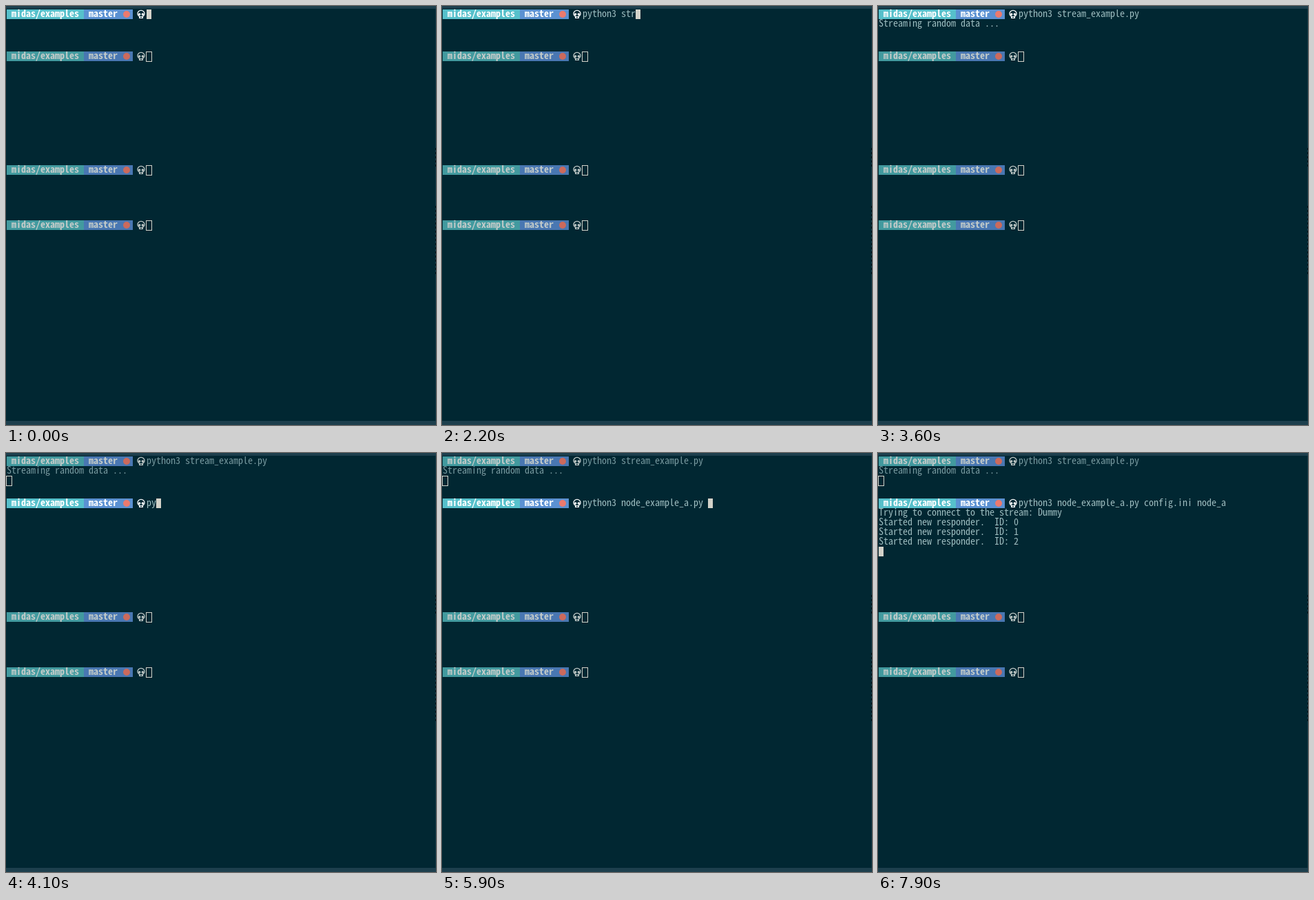
Recreate the animation shown at these times as an HTML page with a canvas. Size 624 px wide and 608 px high, loop 8 s.

```html
<!DOCTYPE html>
<html lang="en">
<head>
<meta charset="utf-8">
<title>Terminal panes</title>
<style>
html, body { margin: 0; width: 624px; height: 608px; overflow: hidden; background: #012732; }
canvas { display: block; }
</style>
</head>
<body>
<canvas id="stage" width="624" height="608"></canvas>
<script>
const ctx = document.getElementById('stage').getContext('2d');
const CELL = 7, ROW = 14, LEFT = 1, INPUT = 204, LOOP = 8000, SWITCH = 3700;
const BG = '#012732', CURSOR = '#d3d2c9';
const FONTS = '"Noto Sans Mono CJK JP", "Noto Sans Mono", "DejaVu Sans Mono", monospace';

// Pick the size at which one character fills one cell.
ctx.font = `100px ${FONTS}`;
const size = 100 * CELL / ctx.measureText('0').width;

const BRIGHT = { path: '#56c0cb', branch: '#5b91d2', dot: '#ec7a6e', label: '#ffffff', text: '#9cbabd' };
const DIM = { path: '#429a9f', branch: '#4977b2', dot: '#cc6a5c', label: '#c3cbc9', text: '#76979d' };

// keys: time at which each successive character appears; jumps: [time, length] for completions.
const panes = [
  { top: 5, command: 'python3 stream_example.py ',
    keys: [400, 600, 800, 1000, 1100, 1300, 1400, 1600, 1800, 2000, 2200, 2400],
    jumps: [[2600, 26]], enter: 3000,
    output: [[3400, 'Streaming random data ...']] },
  { top: 66, command: 'python3 node_example_a.py config.ini node_a',
    keys: [3900, 4000, 4200, 4300, 4400, 4600, 4700, 4900, 5000, 5100, 5200, 5300],
    jumps: [[5400, 21], [5600, 22], [5800, 26], [6000, 27], [6100, 28], [6200, 29],
            [6400, 37], [6600, 38], [6800, 39], [7000, 40], [7100, 43]], enter: 7400,
    output: [[7600, 'Trying to connect to the stream: Dummy'],
             ...[0, 1, 2].map(id => [7800, `Started new responder.  ID: ${id}`])] },
  { top: 231 },
  { top: 311 }
];

function box(x, y, w, h, color) {
  ctx.fillStyle = color;
  ctx.fillRect(x, y, w, h);
}

function write(text, x, top, color, weight = 400) {
  ctx.font = `${weight} ${size}px ${FONTS}`;
  ctx.fillStyle = color;
  ctx.fillText(text, x, top + 11);
}

function disc(x, y, r, color) {
  ctx.fillStyle = color;
  ctx.beginPath();
  ctx.arc(x, y, r, 0, 7);
  ctx.fill();
}

function skull(top, color) {
  ctx.strokeStyle = color;
  ctx.lineWidth = 1.3;
  ctx.beginPath();
  ctx.ellipse(196, top + 6, 5, 4.6, 0, 0, 7);
  ctx.stroke();
  disc(193.7, top + 7, 1.7, color);
  disc(198.3, top + 7, 1.7, color);
  box(193, top + 10, 6, 3, color);
  box(194.5, top + 11, 3, 1, BG);
}

function prompt(top, look) {
  box(LEFT, top, 112, ROW, look.path);
  box(113, top, 71, ROW, look.branch);
  write('midas/examples', 8, top, look.label, 700);
  write('master', 120, top, look.label, 700);
  disc(175, top + 7, 5, look.dot);
  skull(top, look.label);
}

function cursor(x, top, active) {
  if (active) return box(x, top, CELL, ROW, CURSOR);
  ctx.strokeStyle = CURSOR;
  ctx.lineWidth = 1;
  ctx.strokeRect(x - 0.5, top + 0.5, 8, ROW);
}

function typed(pane, t) {
  let count = pane.keys.filter(k => k <= t).length;
  for (const [time, length] of pane.jumps) if (time <= t) count = length;
  return count;
}

function drawPane(pane, t, active) {
  const { top } = pane, look = active ? BRIGHT : DIM;
  prompt(top, look);
  if (!pane.command) return cursor(INPUT, top, false);

  const count = typed(pane, t);
  write(pane.command.slice(0, count), INPUT, top, look.text);
  if (t < pane.enter) return cursor(INPUT + count * CELL, top, active);

  const lines = pane.output.filter(([time]) => time <= t);
  lines.forEach(([, line], i) => write(line, LEFT, top + ROW * (i + 1), look.text));
  const blinkedOff = t >= 3500 && t < SWITCH;
  if (!blinkedOff) cursor(LEFT, top + ROW * (lines.length + 1), active);
}

function draw(now) {
  const t = Math.floor(now % LOOP / 100) * 100;
  box(0, 0, 624, 608, BG);
  box(0, 0, 624, 4, '#1d3f4d');
  box(0, 602, 624, 6, '#1d3f4d');
  box(623, 4, 1, 598, '#123743');
  for (let y = 206; y < 390; y += 6) {
    if (y < 236 || y > 286) box(623, y, 1, 3, '#000c12');
  }
  const current = t < SWITCH ? 0 : 1;
  panes.forEach((pane, i) => drawPane(pane, t, i === current));
}

const start = performance.now();
function tick() {
  draw(performance.now() - start);
  requestAnimationFrame(tick);
}
tick();
</script>
</body>
</html>
```
